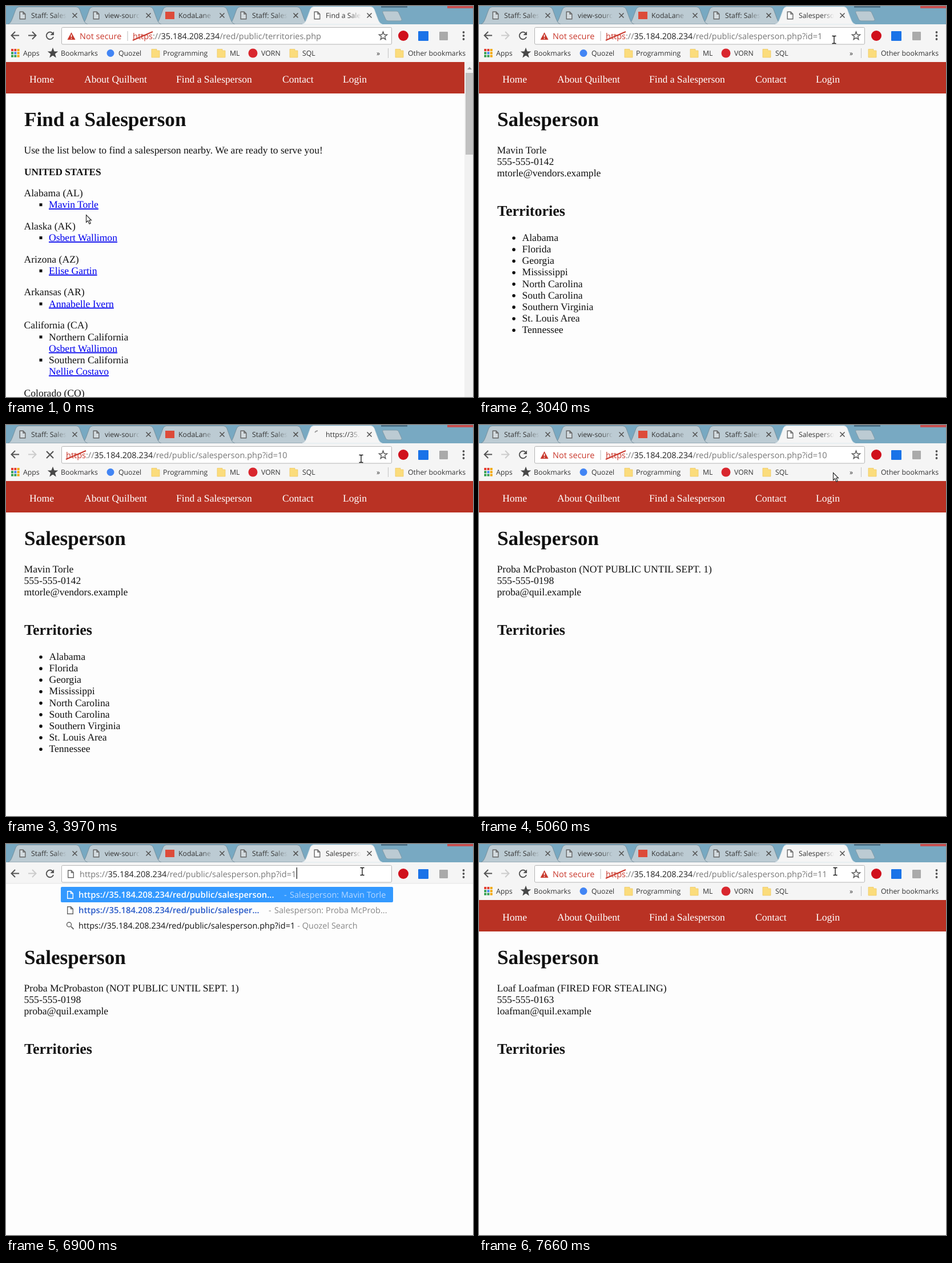
These frames come from a looping animation (818 by 684 pixels, 8 s). An HTML page:

```html
<!DOCTYPE html>
<html lang="en">
<head>
<meta charset="utf-8">
<title>Salesperson lookup</title>
<style>
  html, body { margin: 0; width: 100%; height: 100%; overflow: hidden; background: #fdfdfd; }
  svg { display: block; width: 100vw; height: 100vh; }
  text { white-space: pre; text-rendering: geometricPrecision; }
  .url { font: 14.53px "Open Sans", sans-serif; }
  .match { font: 600 14.9px "Open Sans", sans-serif; }
  .small { font: 12.3px "Open Sans", sans-serif; }
  .body { font: 17.6px "Liberation Serif", serif; }
  .strong { font: bold 17.2px "Liberation Serif", serif; }
  .h1 { font: bold 35.2px "Liberation Serif", serif; }
  .h2 { font: bold 26px "Liberation Serif", serif; }
  .link { fill: #00e; text-decoration: underline; }
</style>
</head>
<body>
<svg viewBox="0 0 818 684">
  <defs>
    <linearGradient id="fade" gradientUnits="userSpaceOnUse" x1="82" x2="103" y1="0" y2="0">
      <stop stop-color="#333"/><stop offset="1" stop-color="#333" stop-opacity="0"/>
    </linearGradient>
  </defs>
  <g id="stage"></g>
</svg>
<script>
const LOOP = 8000;
const HOST = '35.184.208.234';
const PERSON_PATH = '/red/public/salesperson.php?id=';
const people = {
  1: ['Mavin Torle', '555-555-0142', 'mtorle@vendors.example'],
  10: ['Proba McProbaston (NOT PUBLIC UNTIL SEPT. 1)', '555-555-0198', 'proba@quil.example'],
  11: ['Loaf Loafman (FIRED FOR STEALING)', '555-555-0163', 'loafman@quil.example']
};
const territories = ['Alabama', 'Florida', 'Georgia', 'Mississippi', 'North Carolina',
  'South Carolina', 'Southern Virginia', 'St. Louis Area', 'Tennessee'];

// Each step holds until the next one and changes only the listed properties.
const arrow = (x, y) => ({ cursor: ['arrow', x, y] });
const beam = (x, y) => ({ cursor: ['beam', x, y] });
const steps = [
  [0, { page: 0, id: 0, mode: 'chip', caret: false, selected: 0, ...arrow(140, 365) }],
  [150, { cursor: ['hand', 136, 349] }],
  [300, { busy: true }],
  [450, { busy: false, page: 1, id: 1, ...arrow(140, 352) }],
  [605, arrow(225, 300)],
  [760, arrow(400, 210)],
  [910, arrow(560, 135)],
  [1060, arrow(620, 98)],
  [1210, arrow(619, 79)],
  [1370, arrow(622, 68)],
  [1520, beam(622, 62)],
  [1670, beam(619, 60)],
  [1820, { selected: 99 }],
  [1970, beam(618, 61)],
  [2120, beam(617, 61)],
  [2270, beam(619, 58)],
  [2580, { selected: 0, caret: true, ...beam(622, 59) }],
  [3040, { caret: false }],
  [3510, { mode: 'typing', id: 10, caret: true }],
  [3970, { mode: 'loading', busy: true, caret: false }],
  [4130, { mode: 'chip', busy: false, page: 10 }],
  [5060, arrow(620, 83)],
  [5210, beam(623, 60)],
  [5360, { selected: 99 }],
  [5510, { selected: 0, caret: true }],
  [5660, beam(624, 48)],
  [5820, { selected: 1, caret: false }],
  [5970, { selected: 2 }],
  [6900, { mode: 'typing', id: 1, selected: 0, caret: true }],
  [7050, { id: 11 }],
  [7510, { mode: 'loading', busy: true, caret: false }],
  [7660, { mode: 'chip', busy: false, page: 11 }]
];

const pen = document.createElement('canvas').getContext('2d');
const urlWidth = s => {
  pen.font = '14.53px "Open Sans", sans-serif';
  return pen.measureText(s).width;
};
const text = (cls, x, y, s, fill = '#111') => `<text class="${cls}" x="${x}" y="${y}" fill="${fill}">${s}</text>`;
const rect = (x, y, w, h, fill, extra = '') => `<rect x="${x}" y="${y}" width="${w}" height="${h}" fill="${fill}" ${extra}/>`;
const disc = (x, y, r, fill) => `<circle cx="${x}" cy="${y}" r="${r}" fill="${fill}"/>`;
const line = (d, color, width = 2) => `<path d="${d}" fill="none" stroke="${color}" stroke-width="${width}"/>`;
const at = (x, y, content) => `<g transform="translate(${x} ${y})">${content}</g>`;

const docIcon = (x, y, color = '#666', fill = '#fff') =>
  at(x, y, `<path d="M.7.7H6.5L10.3 4.5V13.3H.7ZM6.5.7V4.5H10.3" fill="${fill}" stroke="${color}" stroke-width="1.4"/>`);

function star(x, y, r, fill, stroke) {
  const points = Array.from({ length: 10 }, (_, i) => {
    const a = (i / 5 - 0.5) * Math.PI, d = i % 2 ? r * 0.42 : r;
    return `${x + d * Math.cos(a)},${y + d * Math.sin(a)}`;
  });
  return `<polygon points="${points.join(' ')}" fill="${fill}" stroke="${stroke}" stroke-width="1.4"/>`;
}

function tab(i, title, active, busy) {
  let icon = docIcon(20.5, 9.5, '#666', active ? '#fff' : '#d2dade');
  if (i === 2) icon = rect(18, 10, 16, 13, '#dd4b39');
  if (busy) icon = line('M22 13A7 7 0 0 1 27 10', '#999', 1.8);
  return at(3 + 129 * i, 0,
    `<path d="M0 32C6 30 7 25 14 6Q16 1.5 20 1.5H120Q124 1.5 126 6C133 25 134 30 140 32Z"
      fill="${active ? '#f5f5f5' : '#bccbd3'}" stroke="${active ? '#dce7ec' : '#778f9c'}"/>` +
    icon + text('small', 41, 20.5, title, 'url(#fade)') +
    line('M113.5 12.5l8 8m0-8l-8 8', '#555', 1.6));
}

function tabStrip(s) {
  const titles = ['Staff: Sales', 'view-source', 'KodaLane', 'Staff: Sales'];
  const title = s.mode === 'loading' ? 'https://35.1' : s.page ? 'Salesperson' : 'Find a Sales';
  return rect(0, 0, 818, 32, '#78a9c2') + rect(657, 0, 46, 3, '#4f7389') + rect(773, 0, 45, 4, '#c75050') +
    `<path d="M661 9H684Q687 9 688 12L693 23Q694 26 691 26H669Q666 26 665 23L660 12Q659 9 661 9Z" fill="#bccbd3" stroke="#7f9aa8"/>` +
    titles.map((name, i) => tab(i, name)).reverse().join('') +
    rect(0, 32, 818, 66, '#f5f5f5') + tab(4, title, true, s.busy);
}

function address(s) {
  const x = { chip: 222, typing: 129, loading: 105 }[s.mode];
  const path = s.id ? PERSON_PATH + s.id : '/red/public/territories.php';
  const full = 'https://' + HOST + path;
  const struck = s.mode !== 'typing';
  let out = rect(97.5, 37.5, 578, 29.5, '#fff', 'rx="2" stroke="#b4b4b4"');
  if (s.mode === 'chip') {
    out += '<path d="M114.5 46L121.5 59H107.5Z" fill="#c9382c"/>' + line('M114.5 50v4.5m0 1.5v1.6', '#fff', 1.6) +
      text('url', 129, 58, 'Not secure', '#c9382c') + line('M213 44V61', '#bbb', 1);
  }
  if (s.mode === 'typing') out += docIcon(108, 45.5);
  else out += star(660.5, 52.5, 7.5, 'none', '#555');
  out += `<text class="url" x="${x}" y="58" fill="#777"><tspan fill="${struck ? '#c9382c' : '#777'}">https</tspan>://` +
    `<tspan fill="#222">${HOST}</tspan>${path}</text>`;
  if (struck) out += line(`M${x} 60L${x + 35} 45`, '#c9382c', 2);
  if (s.selected) {
    const start = Math.max(0, full.length - s.selected);
    const left = x + urlWidth(full.slice(0, start));
    out += rect(left, 41, x + urlWidth(full) - left, 21, '#3399ff') + text('url', left, 58, full.slice(start), '#fff');
  }
  if (s.caret) out += rect(x + urlWidth(full) + 0.5, 41, 1.2, 20, '#111');
  return out;
}

function toolbar(s) {
  const forward = s.page ? '#ccc' : '#555';
  const reload = s.busy
    ? line('M71 46l12 12m0-12l-12 12', '#555', 2.2)
    : line('M82 48A6.3 6.3 0 1 0 83 54', '#555') + '<path d="M84 44.5V51H77.5Z" fill="#555"/>';
  return line('M23 51.5H9.5M16 45l-6.5 6.5L16 58', '#555') +
    line('M39 51.5H52.5M46 45l6.5 6.5L46 58', forward) + reload + address(s) +
    disc(696, 52, 9, '#d0101c') + rect(722, 44, 18, 17, '#1a73e8', 'rx="1"') + rect(759, 45, 15, 15, '#aaa', 'rx="1"') +
    [46, 52, 58].map(y => disc(801.5, y, 1.9, '#555')).join('');
}

function bookmarks() {
  const colors = ['#e33b2e', '#e33b2e', '#f2a600', '#34a04f', '#4285f4', '#f2a600', '#34a04f', '#34a04f', '#f2a600'];
  const labels = [[30, 'Apps'], [96, 'Bookmarks'], [197, 'Quozel'], [275, 'Programming'], [392, 'ML'],
    [447, 'VORN'], [519, 'SQL'], [649, '»'], [704, 'Other bookmarks']];
  return colors.map((c, i) => rect(9 + i % 3 * 5.3, 75 + Math.floor(i / 3) * 5.3, 4, 4, c)).join('') +
    star(82, 82.5, 7.8, '#484848', '#484848') + disc(183, 82.5, 6.5, '#4285f4') + disc(432.5, 82.5, 8, '#d9272e') +
    [255, 370, 497, 682].map(x => `<path d="M${x} 75.5h9v2.5h5v12h-14Z" fill="#fbdc7c" stroke="#ecc65c" stroke-width=".7"/>`).join('') +
    labels.map(([x, s]) => text('small', x, 87, s, '#333')).join('') + line('M669.5 74V91', '#c4c4c4', 1);
}

function dropdown(s) {
  const base = 'https://' + HOST + '/red/public/';
  const first = s.id === 1 ? 1 : 10;
  const names = { 1: 'Mavin Torle', 10: 'Proba McProb...' };
  const page = (y, url, dash, id, urlColor, noteColor, paper) =>
    docIcon(107, y - 11.5, paper === 'none' ? '#fff' : '#666', paper) + text('match', 127, y, base + url, urlColor) +
    text('url', dash, y, '-', noteColor) + text('url', dash + 10, y, 'Salesperson: ' + names[id], noteColor);
  const query = base + 'salesperson.php?id=' + s.id;
  return rect(0, 69, 818, 84, '#fdfdfd') + line('M0 69H818', '#e4e4e4', 1) +
    rect(96, 75, 582, 27, '#3399ff', 'rx="2"') +
    page(93.5, 'salesperson...', 487, first, '#fff', '#b6d8ff', 'none') +
    page(120.5, 'salesper...', 460, 11 - first, '#2a5bc8', '#888', '#fff') +
    line('M114 144.5l4.5 4.5', '#666', 1.8) + `<circle cx="110.5" cy="141" r="4" fill="none" stroke="#666" stroke-width="1.5"/>` +
    text('url', 127, 147.5, query) + text('url', 131 + urlWidth(query), 147.5, '- Quozel Search', '#888');
}

function listPage() {
  const body = (x, y, s) => text('body', x, y, s);
  const bullet = y => rect(58.5, y - 8, 5, 5, '#111');
  const link = (y, s) => text('body link', 75, y, s, '#00e');
  const states = [['Alabama (AL)', 'Mavin Torle'], ['Alaska (AK)', 'Osbert Wallimon'],
    ['Arizona (AZ)', 'Elise Gartin'], ['Arkansas (AR)', 'Annabelle Ivern']];
  return text('h1', 32, 209.5, 'Find a Salesperson') +
    body(31.5, 258, 'Use the list below to find a salesperson nearby. We are ready to serve you!') +
    text('strong', 32, 295.5, 'UNITED STATES') +
    states.map(([state, name], i) => {
      const y = 333 + i * 57.8;
      return body(31.5, y, state) + bullet(y + 20.2) + link(y + 20.2, name);
    }).join('') +
    body(31.5, 564.3, 'California (CA)') +
    bullet(584.5) + body(75, 584.5, 'Northern California') + link(604.7, 'Osbert Wallimon') +
    bullet(624.9) + body(75, 624.9, 'Southern California') + link(645, 'Nellie Costavo') +
    body(31.5, 682.5, 'Colorado (CO)') +
    rect(803, 98, 15, 586, '#f1f1f1') + rect(805, 117, 13, 143, '#c1c1c1') + '<path d="M808 111l4-4.5 4 4.5Z" fill="#999"/>';
}

function personPage(id) {
  return text('h1', 32, 209.5, 'Salesperson') +
    people[id].map((s, i) => text('body', 31.5, 258 + i * 20.15, s)).join('') +
    text('h2', 32, 367, 'Territories') +
    (id === 1 ? territories : []).map((s, i) =>
      disc(61, 406 + i * 20.15, 2.8, '#111') + text('body', 75.5, 411 + i * 20.15, s)).join('');
}

function navigation(s) {
  const items = [[41, 'Home'], [137, 'About Quilbent'], [298, 'Find a Salesperson'], [484, 'Contact'], [590, 'Login']];
  return rect(0, 98, s.page ? 818 : 803, 55, '#b93224') +
    items.map(([x, label]) => text('body', x, 133.5, label, '#fff')).join('');
}

function cursor([kind, x, y]) {
  if (kind === 'beam') return at(x, y, line('M-3.5-6.5H-1L0-5.5 1-6.5H3.5M0-5.5V5.5M-3.5 6.5H-1L0 5.5 1 6.5H3.5', '#111', 1.3));
  const shape = kind === 'arrow'
    ? 'M.5.5V13.5L3.5 10.7 6 16.2 8.2 15.2 5.8 9.8H9.5Z'
    : 'M-1 1Q.5-1 2 1V7L9 8.5Q11 9 10.5 12L9 18H1L-4.5 11Q-5 8.5-2.5 9.5L-1 11Z';
  return at(x, y, `<path d="${shape}" fill="#fff" stroke="#222" stroke-width="1.1"/>`);
}

function draw(s) {
  return rect(0, 0, 818, 684, '#fdfdfd') + (s.page ? personPage(s.page) : listPage()) + navigation(s) +
    tabStrip(s) + toolbar(s) + (s.mode === 'typing' ? dropdown(s) : bookmarks()) + cursor(s.cursor);
}

const stage = document.getElementById('stage');
let shown = 0;
function tick() {
  const time = performance.now() % LOOP;
  const past = steps.filter(([start]) => start <= time);
  if (past.length !== shown) {
    shown = past.length;
    stage.innerHTML = draw(Object.assign({}, ...past.map(([, change]) => change)));
  }
  requestAnimationFrame(tick);
}
tick();
</script>
</body>
</html>
```
